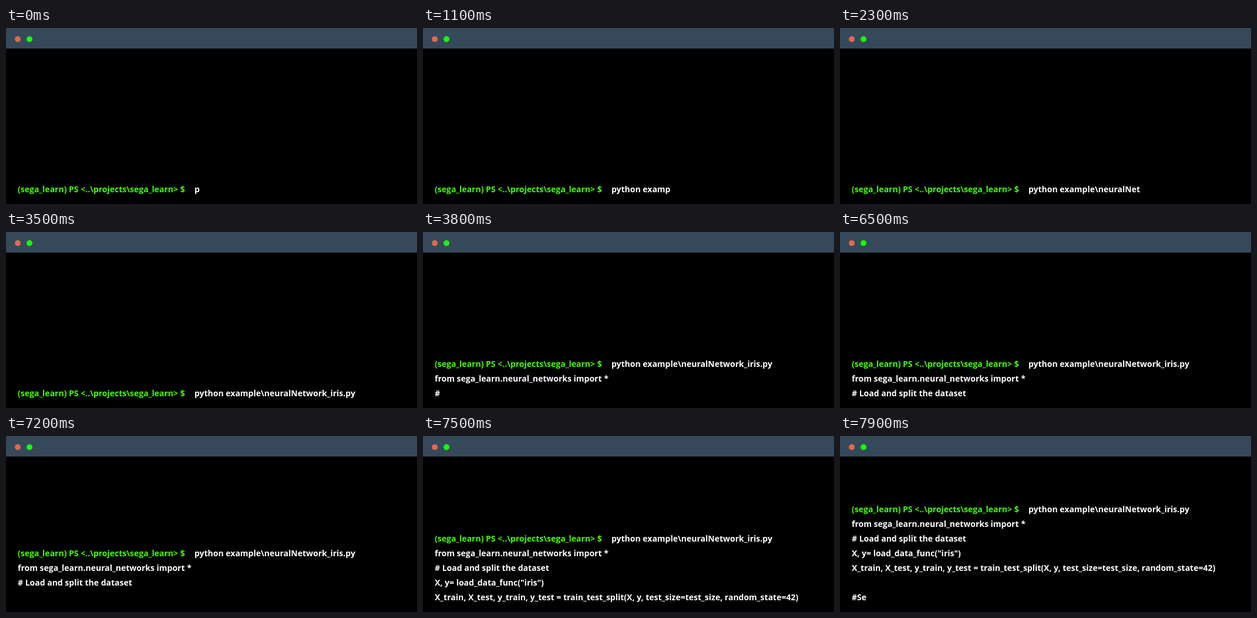
An HTML page for the animation above (8000 ms loop, 700 px wide and 300 px high).

```html
<!DOCTYPE html>
<html lang="en">
<head>
<meta charset="utf-8">
<title>Terminal</title>
<style>
  html, body { margin: 0; width: 100%; height: 100%; overflow: hidden; background: #000; }
  #bar { position: absolute; inset: 0 0 auto; height: 35px; background: #35495a; }
  #bar i { position: absolute; top: 14px; left: 15px; width: 10px; height: 10px; border-radius: 50%; background: #e0694f; }
  #bar i + i { left: 35px; background: #14ff00; }
  #screen {
    position: absolute; left: 20px; top: 287px; margin: 0; transform: translateY(-100%);
    font: 700 14px/25px "Open Sans", "Noto Sans", sans-serif; color: #fff; white-space: pre;
  }
  #screen b { display: inline-block; width: 301px; color: #40ff00; }
</style>
</head>
<body>
<div id="bar"><i></i><i></i></div>
<pre id="screen"><b>(sega_learn) PS &lt;..\projects\sega_learn&gt; $</b><span id="text"></span></pre>
<script>
const LOOP = 8000, STEP = 100;
// Lines with a start time; typed ones gain one character per step.
const lines = [
  { at: 0, text: "python example\\neuralNetwork_iris.py", typed: true },
  { at: 3700, text: "from sega_learn.neural_networks import *" },
  { at: 3800, text: "# Load and split the dataset", typed: true },
  { at: 7200, text: "" },
  { at: 7400, text: 'X, y= load_data_func("iris")', over: true },
  { at: 7500, text: "X_train, X_test, y_train, y_test = train_test_split(X, y, test_size=test_size, random_state=42)" },
  { at: 7600, text: "" },
  { at: 7700, text: "#Se", typed: true },
];
const out = document.getElementById("text");

function contentAt(t) {
  const rows = [];
  for (const { at, text, typed, over } of lines) {
    if (t < at) break;
    if (over) rows.pop();
    rows.push(typed ? text.slice(0, 1 + Math.floor((t - at) / STEP)) : text);
  }
  // A zero-width space keeps an empty last row at full height.
  return rows.join("\n") + "\u200b";
}

function draw(now) {
  const content = contentAt(now % LOOP);
  if (out.textContent !== content) out.textContent = content;
  requestAnimationFrame(draw);
}
draw(performance.now());
</script>
</body>
</html>
```
